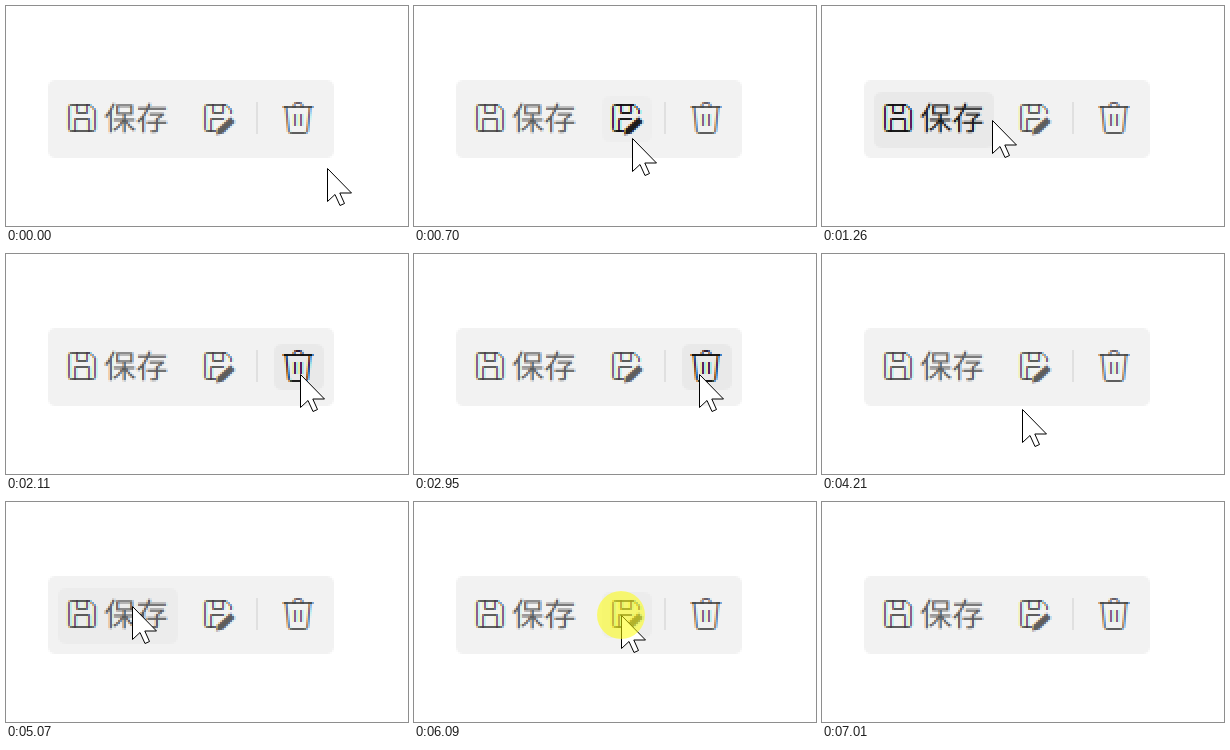
Write an HTML page with a canvas that moves like this. It is 402 px wide and 220 px high and loops after 7510 ms.

```html
<!DOCTYPE html>
<html lang="zh">
<head>
<meta charset="utf-8">
<style>
html, body { margin: 0; width: 100%; height: 100%; overflow: hidden; background: #fff; }
canvas { display: block; }
</style>
</head>
<body>
<canvas id="stage" width="402" height="220"></canvas>
<script>
const LOOP = 7510;
const ctx = document.getElementById('stage').getContext('2d');

// The toolbar is painted at half size and enlarged with hard pixels.
const half = document.createElement('canvas');
half.width = 201;
half.height = 110;
const bar = half.getContext('2d');

// Pointer moves: start, end, and the position reached.
const START = [321, 162];
const MOVES = [
  [420, 900, 156, 114],
  [1160, 1470, 211, 113],
  [1700, 2110, 294, 120],
  [2850, 3370, 204, 119],
  [3800, 4040, 208, 160],
  [4180, 4340, 126, 104],
  [5070, 5340, 158, 154],
  [5510, 5860, 207, 113],
  [6430, 7010, 412, 224]
];
const CLICKS = [[2380, 2420], [4640, 4670], [6090, 6130]];
const DIMMED = [...CLICKS, [5070, 5340]];

const SLOT = 'M4.5 .5V4.5H9.5V.5';
const SAVE = new Path2D('M1.5 .5H11L13.5 3V12.5Q13.5 13.5 12.5 13.5H1.5Q.5 13.5 .5 12.5V1.5Q.5 .5 1.5 .5Z' +
  SLOT + 'M3.5 13.5V7.5H10.5V13.5');
const EDIT = new Path2D('M6 13.5H1.5Q.5 13.5 .5 12.5V1.5Q.5 .5 1.5 .5H11L13.5 3V5' +
  SLOT + 'M3.5 13.5V7.5H10');
const PENCIL = new Path2D('M13.2 6.6L15.5 9L9.5 14.8L6 15.5L6.7 12.5Z');
const TRASH = new Path2D('M0 2.5H15M5.5 2.5V1.5Q5.5 .5 6.5 .5H8.5Q9.5 .5 9.5 1.5V2.5' +
  'M1.5 2.5L2.8 14.5Q2.9 15.5 4 15.5H11Q12.1 15.5 12.2 14.5L13.5 2.5M6 6V12M9 6V12');
const ARROW = new Path2D('M.5 .5V33.5L8 26.5L13 37.5L17.5 35.5L12.8 25H24.5Z');

const BUTTONS = [
  { box: [26, 43, 60, 28], draw() {
    icon(SAVE, 31, 49);
    bar.font = '300 16px "Noto Sans CJK SC", "Noto Sans CJK", sans-serif';
    bar.textRendering = 'geometricPrecision';
    bar.fillText('保存', 49, 62);
  } },
  { box: [94, 45, 25, 23], draw() {
    icon(EDIT, 99, 49);
    bar.translate(99, 49);
    bar.fill(PENCIL);
  } },
  { box: [134, 45, 25, 23], draw() { icon(TRASH, 138.5, 48); } }
];

const within = (ranges, t) => ranges.some(([from, to]) => t >= from && t < to);

function pointerAt(t) {
  let [x, y] = START;
  for (const [from, to, endX, endY] of MOVES) {
    if (t <= from) break;
    const p = Math.min(1, (t - from) / (to - from));
    const eased = p * p * (3 - 2 * p);
    x += (endX - x) * eased;
    y += (endY - y) * eased;
  }
  return [x, y];
}

function isOver([x, y, w, h], t) {
  const [px, py] = pointerAt(t);
  return px >= 2 * x && px < 2 * (x + w) && py >= 2 * y && py < 2 * (y + h);
}

function icon(path, x, y) {
  bar.save();
  bar.translate(x, y);
  bar.stroke(path);
  bar.restore();
}

// Subpixel smoothing: each colour channel is darkened a third of a pixel apart.
function drawSubpixel(draw, shade) {
  [0, 1, 2].forEach(channel => {
    const rgb = [255, 255, 255];
    rgb[channel] = shade;
    bar.save();
    bar.globalCompositeOperation = 'multiply';
    bar.fillStyle = bar.strokeStyle = `rgb(${rgb})`;
    bar.translate((1 - channel) / 3, 0);
    draw();
    bar.restore();
  });
}

function roundBox(x, y, w, h, r, color) {
  bar.fillStyle = color;
  bar.beginPath();
  bar.roundRect(x, y, w, h, r);
  bar.fill();
}

function drawButton({ box, draw }, t) {
  const dimmed = within(DIMMED, t);
  // Averaging recent hover states gives a short background fade.
  const glow = [0, 20, 40, 60].filter(lag => isOver(box, t - lag)).length / 4;
  roundBox(...box, 4, `rgba(0,0,0,${glow * (dimmed ? 0.022 : 0.035)})`);
  drawSubpixel(draw, isOver(box, t) && !dimmed ? 28 : 98);
}

function drawPointer(x, y) {
  ctx.save();
  ctx.translate(Math.round(x), Math.round(y));
  ctx.fillStyle = '#fff';
  ctx.strokeStyle = '#000';
  ctx.fill(ARROW);
  ctx.stroke(ARROW);
  ctx.restore();
}

function drawClick(x, y) {
  ctx.fillStyle = 'rgba(255,255,0,.53)';
  ctx.beginPath();
  ctx.arc(x, y, 24, 0, 2 * Math.PI);
  ctx.fill();
}

function render(t) {
  bar.clearRect(0, 0, 201, 110);
  roundBox(21, 37, 143, 39, 4, '#f2f2f2');
  bar.fillStyle = '#e0e0e0';
  bar.fillRect(125, 48, 1, 16);
  BUTTONS.forEach(button => drawButton(button, t));

  ctx.fillStyle = '#fff';
  ctx.fillRect(0, 0, 402, 220);
  ctx.imageSmoothingEnabled = false;
  ctx.drawImage(half, 0, 0, 402, 220);

  const [x, y] = pointerAt(t);
  drawPointer(x, y);
  if (within(CLICKS, t)) drawClick(x, y);
}

const begin = performance.now();
function tick() {
  render((performance.now() - begin) % LOOP);
  requestAnimationFrame(tick);
}
tick();
</script>
</body>
</html>
```
